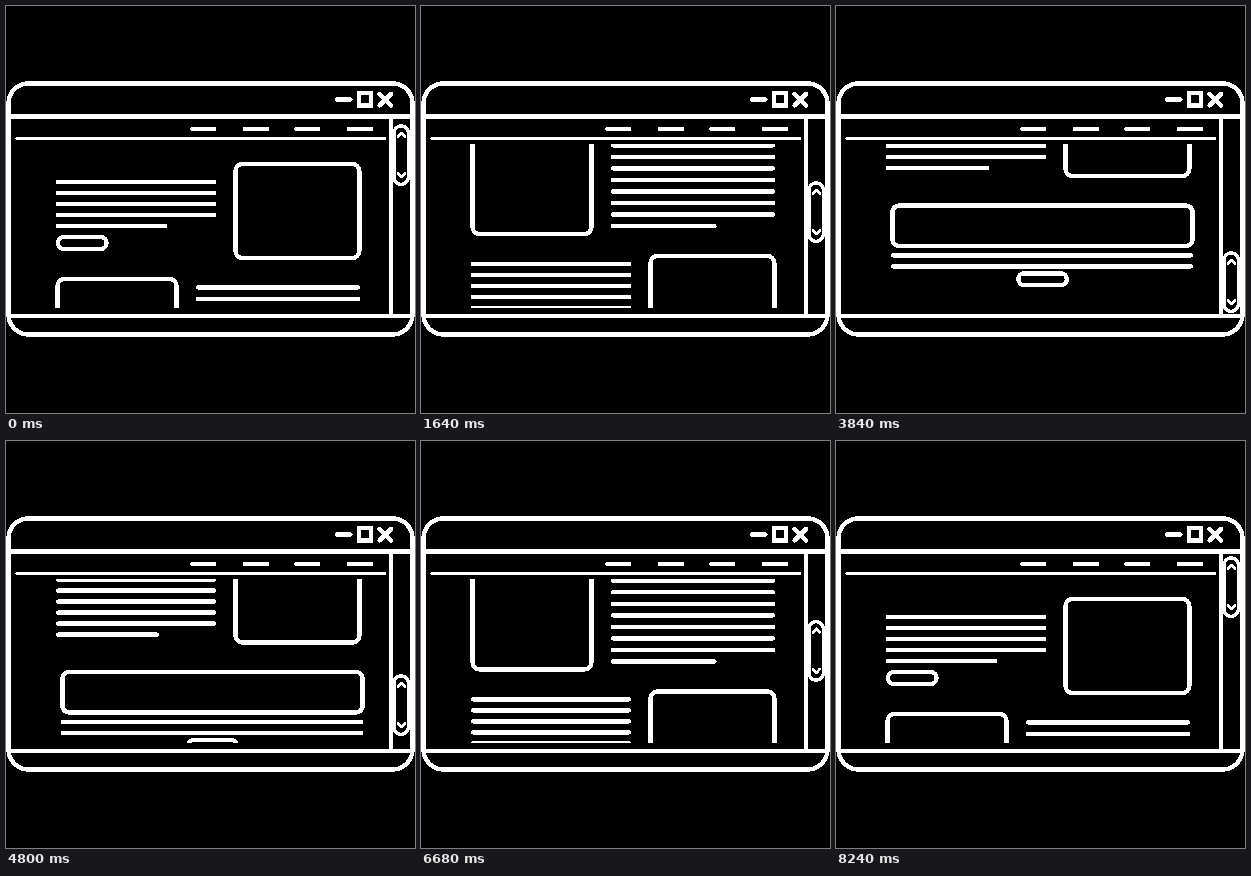
Animation of 409 by 407 pixels, one loop 8960 ms. Source, as an HTML page:

```html
<!DOCTYPE html>
<html lang="en">
<head>
<meta charset="utf-8">
<title>Scrolling browser window</title>
<style>
  html, body { margin: 0; width: 100%; height: 100%; overflow: hidden; background: #000; }
  svg { display: block; width: 100%; height: 100%; shape-rendering: crispEdges; }
  .ink { fill: none; stroke: #fff; stroke-width: 4.4; stroke-linecap: round; stroke-linejoin: round; }
  .thin { stroke-width: 3.4; }
</style>
</head>
<body>
<svg viewBox="0 0 409 407">
  <defs>
    <clipPath id="view"><rect x="40" y="138" width="330" height="164"/></clipPath>
  </defs>
  <g class="ink" clip-path="url(#view)"><g id="page"></g></g>
  <g class="ink">
    <rect x="2.5" y="77.4" width="404" height="251.1" rx="20"/>
    <path d="M3 110.6H406M3 310H406M385 111V309"/>
    <path class="thin" d="M11 132.3H378.5"/>
    <path d="M186.5 123H208M239 123H261M290.5 123H312M343 123H365"/>
    <path d="M331 93.5H344.5"/>
    <rect x="353" y="87" width="12" height="12.6" stroke-linejoin="miter"/>
    <path d="M373.5 88L385 99.5M385 88L373.5 99.5"/>
  </g>
  <g id="thumb" class="ink thin">
    <rect x="387.8" y="119.8" width="14.6" height="58.6" rx="7.3" fill="#000"/>
    <path stroke-width="2.8" d="M392 130.5L395.3 127L398.6 130.5M392 167.5L395.3 171L398.6 167.5"/>
  </g>
</svg>
<script>
const LOOP = 8960, TICK = 40;
const page = document.getElementById('page');
const thumb = document.getElementById('thumb');

function add(tag, attrs) {
  const el = document.createElementNS('http://www.w3.org/2000/svg', tag);
  for (const key in attrs) el.setAttribute(key, attrs[key]);
  page.append(el);
}

function box(x, y, width, height, rx = 7) {
  add('rect', { x, y, width, height, rx });
}

function text(x, y, count, gap, right, lastRight) {
  let d = '';
  for (let i = 0; i < count; i++) {
    d += `M${x} ${y + i * gap}H${i === count - 1 ? lastRight : right}`;
  }
  add('path', { d });
}

text(52, 176, 5, 11, 208.2, 159);
box(52, 231, 48.5, 12, 6);
box(229.5, 158, 123.8, 94);

box(51.5, 273, 119, 120);
text(192, 281.3, 10, 11.53, 352, 293.5);

text(52, 423, 8, 11, 208.2, 151);
box(229.5, 415, 123.8, 93);

box(56.3, 537.4, 300.4, 40.6);
text(57, 587.4, 2, 11, 355, 355);
box(182.3, 605.4, 48.5, 11.6, 5.8);

// start, end, page offset from/to, thumb offset from/to
const moves = [
  [0, 1640, 0, 165, 0, 57],
  [2105, 3820, 165, 338, 57, 127],
  [4380, 6225, 338, 165, 127, 61],
  [6655, 8240, 165, 0, 61, -3]
];

// cubic-bezier(.167, 0, .833, 1)
function ease(x) {
  let lo = 0, hi = 1;
  for (let i = 0; i < 24; i++) {
    const t = (lo + hi) / 2, u = 1 - t;
    const bx = 3 * u * u * t * 0.167 + 3 * u * t * t * 0.833 + t * t * t;
    if (bx < x) lo = t; else hi = t;
  }
  return lo * lo * (3 - 2 * lo);
}

function draw(time) {
  let scroll = 0, slide = 0;
  for (const [start, end, s0, s1, t0, t1] of moves) {
    if (time < start) break;
    const p = time >= end ? 1 : ease((time - start) / (end - start));
    scroll = s0 + (s1 - s0) * p;
    slide = t0 + (t1 - t0) * p;
  }
  page.setAttribute('transform', `translate(0 ${-scroll})`);
  thumb.setAttribute('transform', `translate(0 ${slide})`);
}

const begin = performance.now();
function loop() {
  const time = (performance.now() - begin) % LOOP;
  draw(Math.floor(time / TICK) * TICK);
  requestAnimationFrame(loop);
}
loop();
</script>
</body>
</html>
```
